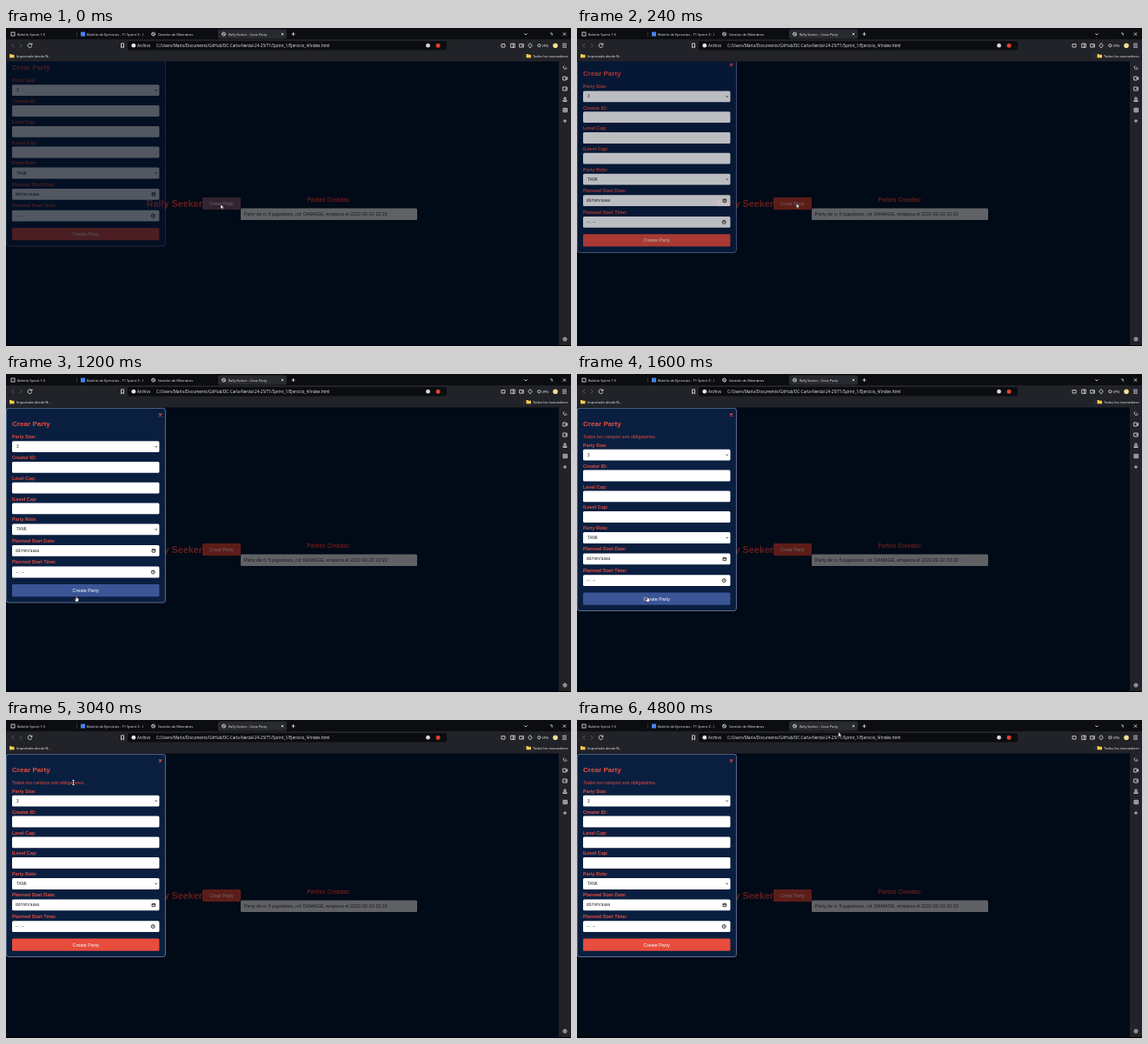
Recreate the animation shown at these times as an HTML page. Size 650 by 366 pixels, loop 4.88 s.

```html
<!DOCTYPE html>
<html lang="es">
<head>
<meta charset="utf-8">
<title>Rally Seeker</title>
<style>
html, body { margin: 0; width: 100%; height: 100%; overflow: hidden; background: #000; }
svg { display: block; width: 650px; height: 366px; font: 5.42px "Liberation Sans", Arial, sans-serif; }
text { dominant-baseline: central; white-space: pre; }
.ui { font: 4px "Open Sans", "Noto Sans", sans-serif; fill: #eeeff2; }
.b { font-weight: bold; }
.red { fill: #e74c3c; }
.mid { text-anchor: middle; }
.field text { font-size: 4.6px; fill: #222; }
.icon { fill: none; stroke: #dcdde1; stroke-width: .85; }
</style>
</head>
<body>
<svg viewBox="0 0 650 366">
  <clipPath id="view"><rect y="38.5" width="636" height="327"/></clipPath>

  <g id="page">
    <rect y="38" width="636" height="327" fill="#010a17"/>
    <text class="b" x="226" y="202" text-anchor="end" font-size="10.83" fill="#651d1a">Rally Seeker</text>
    <rect id="open" x="226" y="195" width="44" height="14" rx="1.5"/>
    <text class="mid" x="248" y="202" fill="#6c6c70">Crear Party</text>
    <text class="b mid" x="371.5" y="197.3" font-size="6.34" fill="#651d1a">Parties Creadas:</text>
    <rect x="270" y="207.5" width="203" height="13.5" rx="1.5" fill="#606164"/>
    <text x="274" y="214" fill="#17191d">Party de n: 5 jugadores, rol: DAMAGE, empieza el 2222-02-22 22:22</text>
  </g>

  <g clip-path="url(#view)">
    <g id="modal">
      <rect id="box" x=".3" y="39.3" width="183.1" rx="2.8" fill="#0a1f40" stroke="#8099bd" stroke-width=".7"/>
      <path d="M176 45.5l3 3m0-3l-3 3" stroke="#e74c3c" stroke-width="1.2"/>
      <text class="b red" x="7" y="57.6" font-size="8.12">Crear Party</text>
      <text id="error" class="red" x="7" y="72">Todos los campos son obligatorios.</text>
      <g id="form">
        <rect id="send" x="7" y="242" width="169.4" height="14.2" rx="1.5"/>
        <text class="mid" x="91.7" y="249" fill="#fff">Create Party</text>
      </g>
    </g>
  </g>

  <g id="chrome">
    <rect width="650" height="13" fill="#0c0d11"/>
    <path d="M0 13h650v352h-14v-326.5h-636z" fill="#222328"/>
    <rect x="244" y="1.5" width="79" height="11" rx="2" fill="#292a30"/>
    <rect x="140" y="15" width="367" height="10.5" rx="2" fill="#0c0d11"/>
    <path d="M81.5 4v6M595.5 29v6" stroke="#45464c" stroke-width=".6"/>
    <g class="ui">
      <text x="13" y="7">Boletín Sprint 1.5</text>
      <text x="93" y="7">Boletín de Ejercicios - T1 Sprint 3 - I</text>
      <text x="175" y="7">Gestión de Miembros</text>
      <text x="256" y="7" font-size="3.8">Rally Seeker - Crear Party</text>
      <text x="151" y="20.3" style="font-size:4.4px">Archivo</text>
      <text x="173" y="20.3" style="font-size:4.6px">C:/Users/Mario/Documents/GitHub/DC-Carla-Nerdal-24-25/T1/Sprint_1/Ejercicio_4/index.html</text>
      <text x="12" y="32.2">Importado desde N...</text>
      <text x="606" y="32.2">Todos los marcadores</text>
      <text x="616.5" y="20.3" style="font-size:3.8px">VPN</text>
    </g>
    <rect x="86" y="4.5" width="5" height="5" fill="#4285f4"/>
    <circle cx="485.5" cy="20.2" r="2.4" fill="#d8d9dd"/>
    <circle cx="497" cy="20.2" r="2.5" fill="#e0402f"/>
    <circle cx="632" cy="20.2" r="2.8" fill="#f0df95"/>
    <circle cx="146.8" cy="20.2" r="2.4" fill="#e4e4e8"/>
    <path d="M4 30h2l.7.8h2.8v3.4h-5.5zM598.5 30h2l.7.8h2.8v3.4h-5.5z" fill="#f2c94c"/>
    <g class="icon">
      <rect x="6" y="5" width="4" height="4"/>
      <circle cx="169.5" cy="7" r="2"/><path d="M168 6l3 2"/>
      <circle cx="250.5" cy="7" r="2"/><path d="M249 6l3 2"/>
      <path d="M316.8 5.8l2.4 2.4m0-2.4l-2.4 2.4M328.5 7h4M330.5 5v4M596.3 6.3l1.7 1.6 1.7-1.6M626 6h2.2v2.6M640.8 5.3l3.4 3.4m0-3.4l-3.4 3.4"/>
      <path d="M9 18l-2.2 2.2 2.2 2.2M16 18l2.2 2.2-2.2 2.2" stroke="#66676d"/>
      <path d="M29.7 19a2.4 2.4 0 1 0 .1 2M30 17.6v1.8h-1.8M132.5 17.8h3v5l-1.5-1.3-1.5 1.3z"/>
      <path d="M570 18.5h4v3.5h-4zM580.7 18h4.6v4.4h-4.6zM583.5 18v4.4M590.7 18.5h4.6v3.6h-4.6zM593 20.3h2.3M603 17.5l2.3 2.7-2.3 2.7-2.3-2.7zM640 18.2h5M640 20.2h5M640 22.2h5"/>
      <circle cx="613.3" cy="20.2" r="1.6"/>
      <path d="M644.5 47a2 2 0 1 1-2.3-3.6M643.5 45l2 1.8M640.7 56h3.4v4h-3.4zM644.1 58l1.6-1.4v2.8zM640.7 68h4.6v4h-4.6zM643 70h2.3M641 84.5v-1.5h4v1.5zM641 92.4h4.5v4.2h-4.5zM641 94.5h4.5M643.2 92.4v4.2M641 107h4M643 105v4"/>
      <circle cx="643" cy="81" r="1.2"/>
      <circle cx="643" cy="358.2" r="2"/><circle cx="643" cy="358.2" r=".6"/>
    </g>
  </g>

  <g id="cursor" stroke="#111" stroke-width=".5">
    <path id="arrow" d="M0 0v5.3l1.3-1.1.9 1.9 1-.5-.9-1.8h1.7z" fill="#fff"/>
    <path id="hand" d="M-.6 0q.6-.6 1.2 0v2l2 .6v2l-.7 1.8h-2.6l-1.6-2.5.5-.6 1.2.8z" fill="#fff"/>
    <path id="beam" d="M-1.3-2.6h2.6M0-2.6v5.2M-1.3 2.6h2.6" fill="none" stroke="#e8e8ee" stroke-width=".8"/>
  </g>
</svg>
<script>
const LOOP = 4880, STEP = 80;
const $ = id => document.getElementById(id);
const ramp = (t, start, length) => Math.min(1, Math.max(0, (t - start) / length));
const mix = (a, b, k) => `rgb(${a.map((v, i) => Math.round(v + (b[i] - v) * k))})`;

const chevron = 'M171.5 -.7l1.1 1.3 1.1-1.3';
const calendar = 'M168 -1.6h3.6v3.4h-3.6zM168 -.6h3.6';
const clock = 'M167.2 0a2 2 0 1 0 4 0a2 2 0 1 0-4 0M169.2-1.2v1.2h1';
// label, label y, field y, value, icon
const rows = [
  ['Party Size:', 72, 83.6, '3', chevron],
  ['Creator ID:', 96.3, 107.4, '', ''],
  ['Level Cap:', 120, 131.2, '', ''],
  ['ILevel Cap:', 143.7, 154.9, '', ''],
  ['Party Role:', 167.4, 178.9, 'TANK', chevron],
  ['Planned Start Date:', 191.8, 203.3, 'dd\u200a/\u200amm\u200a/\u200aaaaa', calendar],
  ['Planned Start Time:', 216.2, 228, '-- : --', clock]
];
$('form').insertAdjacentHTML('afterbegin', rows.map(([label, ly, fy, value, icon]) => `
  <text class="b red" x="7" y="${ly}">${label}</text>
  <g class="field" transform="translate(0 ${fy})">
    <rect x="7" y="-6.4" width="169.4" height="12.8" rx="1.5" fill="#fff"/>
    <text x="${icon === chevron ? 12 : 11}" y="0">${value}</text>
    <path d="${icon}" fill="none" stroke="#222" stroke-width=".85"/>
  </g>`).join(''));

// time, x, y of the pointer
const route = [
  [0, 247, 203], [160, 250, 207], [400, 259, 187.5], [640, 250, 192], [1040, 86, 248],
  [1200, 81, 255.7], [1720, 81, 256], [2080, 20, 55], [2320, 16, 71], [2720, 82, 73],
  [3040, 77.5, 72], [3360, 264, 84], [3920, 266, 100], [4200, 270, 90],
  [4480, 311, 16], [4800, 300.7, 14]
];
function pointerAt(t) {
  const i = route.findIndex(p => p[0] > t);
  if (i < 0) return route.at(-1).slice(1);
  const [a, b] = [route[i - 1], route[i]];
  const k = ramp(t, a[0], b[0] - a[0]), e = k * k * (3 - 2 * k);
  return [a[1] + (b[1] - a[1]) * e, a[2] + (b[2] - a[2]) * e];
}

const show = (id, on) => $(id).setAttribute('visibility', on ? 'visible' : 'hidden');

function draw(t) {
  const shown = 1 - .68 * (1 - ramp(t, 0, 420)) ** 1.1;
  $('modal').setAttribute('opacity', shown);
  $('modal').setAttribute('transform', `translate(0 ${-17.5 * (1 - shown)})`);
  $('open').setAttribute('fill', mix([52, 36, 50], [92, 29, 25], ramp(t, 0, 160)));

  const failed = t >= 1360;
  show('error', failed);
  $('form').setAttribute('transform', `translate(0 ${failed ? 9.6 : 0})`);
  $('box').setAttribute('height', failed ? 233.2 : 223.8);
  const hover = ramp(t, 960, 240) - ramp(t, 1760, 240);
  $('send').setAttribute('fill', mix([231, 76, 60], [59, 85, 151], hover));

  const [x, y] = pointerAt(t);
  const hand = x > 7 && x < 176 && y > (failed ? 251 : 242) && y < 266;
  const beam = t >= 2080 && x < 91 && y < 80;
  $('cursor').setAttribute('transform', `translate(${x} ${y})`);
  show('hand', hand);
  show('beam', beam);
  show('arrow', !hand && !beam);
}

const begin = performance.now();
function tick() {
  const t = (performance.now() - begin) % LOOP;
  draw(Math.floor(t / STEP) * STEP);
  requestAnimationFrame(tick);
}
tick();
</script>
</body>
</html>
```
